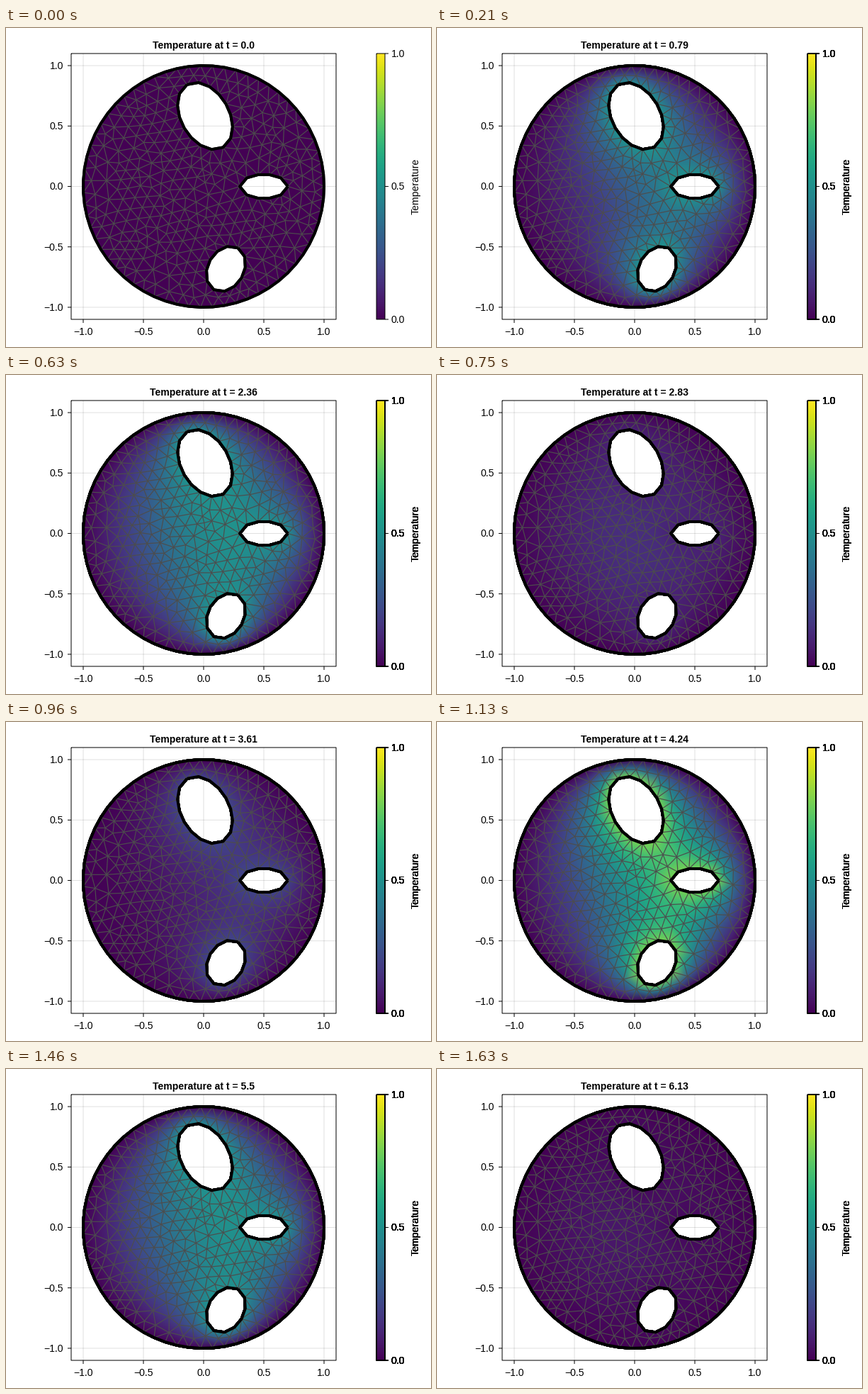
A matplotlib script that plays this animation: 600 px wide and 450 px high, repeating every 1.67 s.

```python
import numpy as np
import matplotlib.pyplot as plt
from matplotlib.animation import FuncAnimation
from matplotlib.collections import LineCollection
from matplotlib.path import Path
from matplotlib.tri import Triangulation

W, H, DPI = 600, 450, 100
PX = 72 / DPI                      # one pixel in points
FPS, STATES = 24, 40
TICK_MS, LOOP_MS = 10, 1670        # states start on a 10 ms clock
STEP = 2 * np.pi / STATES
SUBSTEPS = 20
DIFFUSIVITY = 0.7
EDGE = 0.1
LAYERS = 8                         # overdrawn copies until edges saturate
LEFT, RIGHT, TOP, BOTTOM = 92, 466, 36, 411
BAR_L, BAR_R = 523, 535


def ring(cx, cy, a, b, tilt):
    """Ellipse vertices spaced evenly along the arc."""
    s = np.linspace(0, 2 * np.pi, 2001)
    x, y = a * np.cos(s), b * np.sin(s)
    arc = np.concatenate([[0], np.cumsum(np.hypot(np.diff(x), np.diff(y)))])
    n = int(np.ceil(arc[-1] / EDGE))
    s = np.interp(np.arange(n) * arc[-1] / n, arc, s)
    x, y = a * np.cos(s), b * np.sin(s)
    c, d = np.cos(np.radians(tilt)), np.sin(np.radians(tilt))
    return np.column_stack([cx + c * x - d * y, cy + d * x + c * y])


def closed(points):
    return np.vstack([points, points[:1]])


def to_px(points):
    p = np.asarray(points, float)
    mid = np.array([(LEFT + RIGHT) / 2, (TOP + BOTTOM) / 2])
    scale = np.array([RIGHT - LEFT, TOP - BOTTOM]) / 2.2
    return mid + p * scale


def triangulate(points, holes):
    tris = Triangulation(points[:, 0], points[:, 1]).triangles
    centre = points[tris].mean(axis=1)
    keep = np.ones(len(tris), bool)
    for hole in holes:
        keep &= ~Path(closed(hole)).contains_points(centre)
    return Triangulation(points[:, 0], points[:, 1], tris[keep])


def clear_of(points, holes, margin):
    """Drop points inside a hole or closer to its edge than margin."""
    for hole in holes:
        loop = closed(hole)
        f = np.linspace(0, 1, 8)[:, None, None]
        dense = (loop[:-1] * (1 - f) + loop[1:] * f).reshape(-1, 2)
        gap = np.linalg.norm(points[:, None] - dense[None], axis=2).min(axis=1)
        points = points[~Path(loop).contains_points(points) & (gap > margin)]
    return points


def build_mesh(outer, holes):
    rng = np.random.default_rng(4)
    g = np.arange(-15, 16)
    i, j = np.meshgrid(g, g)
    x, y = (i + 0.5 * (j % 2)) * 0.097, j * 0.097 * np.sqrt(3) / 2
    c, d = np.cos(0.17), np.sin(0.17)
    inner = np.column_stack([(c * x - d * y).ravel(), (d * x + c * y).ravel()])
    inner += rng.normal(0, 0.018, inner.shape)
    inner = inner[np.hypot(*inner.T) < 0.85]
    s = (np.arange(58) + 0.5) * 2 * np.pi / 58
    layer = 0.92 * np.column_stack([np.cos(s), np.sin(s)])

    fixed = np.vstack([outer, *holes])
    points = np.vstack([fixed, clear_of(layer, holes, 0.025),
                        clear_of(inner, holes, 0.055)])
    n = len(fixed)
    for _ in range(6):
        e = triangulate(points, holes).edges
        total, count = np.zeros_like(points), np.zeros(len(points))
        for a, b in (e.T, e.T[::-1]):
            np.add.at(total, a, points[b])
            np.add.at(count, a, 1)
        mean = total[n:] / np.maximum(count[n:], 1)[:, None]
        points[n:] += 0.6 * (mean - points[n:])
    return points, triangulate(points, holes), n


def solve_heat(points, tris, n_outer, n_fixed):
    """Linear elements, lumped mass, hole edges held at sin(t)^2."""
    p = points[tris]
    x, y = p[..., 0], p[..., 1]
    b = np.roll(y, -1, 1) - np.roll(y, -2, 1)
    c = np.roll(x, -2, 1) - np.roll(x, -1, 1)
    area = np.abs(b[:, 0] * c[:, 1] - b[:, 1] * c[:, 0]) / 2
    local = b[:, :, None] * b[:, None, :] + c[:, :, None] * c[:, None, :]
    local /= 4 * area[:, None, None]
    n = len(points)
    stiff, mass = np.zeros((n, n)), np.zeros(n)
    np.add.at(stiff, (tris[:, :, None], tris[:, None, :]), local)
    np.add.at(mass, tris, np.repeat(area[:, None] / 3, 3, axis=1))

    dt = STEP / SUBSTEPS
    free = slice(n_fixed, n)
    k = DIFFUSIVITY * dt * stiff
    inverse = np.linalg.inv(np.diag(mass[free]) + k[free, free])
    source = k[free, n_outer:n_fixed].sum(axis=1)
    u = np.zeros(n)
    states = [u.copy()]
    for step in range(1, (STATES - 1) * SUBSTEPS + 1):
        heat = np.sin(step * dt) ** 2
        u[n_outer:n_fixed] = heat
        u[free] = inverse @ (mass[free] * u[free] - source * heat)
        if step % SUBSTEPS == 0:
            states.append(u.copy())
    return states


outer = ring(0, 0, 1, 1, 0)
holes = [ring(0.012, 0.583, 0.3, 0.2, 120),
         ring(0.5, 0, 0.2, 0.1, 0),
         ring(0.185, -0.682, 0.2, 0.15, 60)]
points, mesh, n_fixed = build_mesh(outer, holes)
states = solve_heat(points, mesh.triangles, len(outer), n_fixed)

plt.rcParams["font.family"] = "Liberation Sans"
fig = plt.figure(figsize=(W / DPI, H / DPI), dpi=DPI, facecolor="white")
ax = fig.add_axes([0, 0, 1, 1])
ax.axis("off")


def segments(lines, color="black", width=1.0, z=1):
    coll = LineCollection(lines, colors=[color], linewidths=width * PX, zorder=z)
    coll.set_snap(False)
    return ax.add_collection(coll, autolim=False)


def label(x, y, text, ha="center", z=6, **kw):
    return ax.text(x, y, text, ha=ha, va="baseline", fontsize=14 * PX,
                   rotation_mode="anchor", zorder=z, **kw)


def box(left, right):
    return [(left, TOP), (right, TOP), (right, BOTTOM), (left, BOTTOM), (left, TOP)]


# Plot frame, grid and ticks
grid, ticks = [], []
for v in (-1, -0.5, 0, 0.5, 1):
    x, y = to_px((v, v))
    grid += [[(x, TOP), (x, BOTTOM)], [(LEFT, y), (RIGHT, y)]]
    ticks += [[(x, BOTTOM), (x, BOTTOM + 5)], [(LEFT - 5, y), (LEFT, y)]]
    text = f"{v:.1f}".replace("-", "\u2212")
    label(x, 433, text)
    label(81, y + 5, text, ha="right")
segments(grid, (0, 0, 0, 0.12), z=0)
segments(ticks + [box(LEFT, RIGHT)], z=5)

# Temperature field and its mesh
px = to_px(points)
field = ax.tripcolor(Triangulation(px[:, 0], px[:, 1], mesh.triangles), states[0],
                     shading="gouraud", cmap="viridis", vmin=0, vmax=1, zorder=2)
segments(px[mesh.edges], (0.3, 0.3, 0.3), 1.2, z=3)


def outline(z):
    loops = [to_px(closed(r)) for r in (outer, *holes)]
    return segments(loops, width=4, z=z)


outline(4)

# Colour bar
ax.imshow(np.linspace(1, 0, 375)[:, None], cmap="viridis", aspect="auto",
          extent=(BAR_L, BAR_R, BOTTOM, TOP), zorder=2)


def bar_layer():
    """One pass of the parts that are painted again at every step."""
    levels = [(v, BOTTOM + (TOP - BOTTOM) * v) for v in (0, 0.5, 1)]
    marks = [[(BAR_R, y), (BAR_R + 5, y)] for _, y in levels]
    parts = [segments(marks + [box(BAR_L, BAR_R)], z=5), outline(1)]
    parts += [label(543.6, y + 5, f"{v:.1f}", ha="left") for v, y in levels]
    parts.append(label(582.8, 223.5, "Temperature", rotation=90))
    return parts


layers = [bar_layer() for _ in range(LAYERS)]
title = label(279, 28.7, "", weight="bold")
ax.set_xlim(0, W)
ax.set_ylim(H, 0)


def update(tick):
    # start times are k / FPS rounded to the nearest clock tick
    k = (tick * TICK_MS + 4) * FPS // 1000
    field.set_array(states[k])
    title.set_text(f"Temperature at t = {round(k * STEP, 2)}")
    for i, parts in enumerate(layers):
        for part in parts:
            part.set_visible(i <= k)
    return []


anim = FuncAnimation(fig, update, frames=LOOP_MS // TICK_MS,
                     init_func=lambda: update(0), interval=TICK_MS,
                     repeat=True, repeat_delay=0)
plt.show()
```
